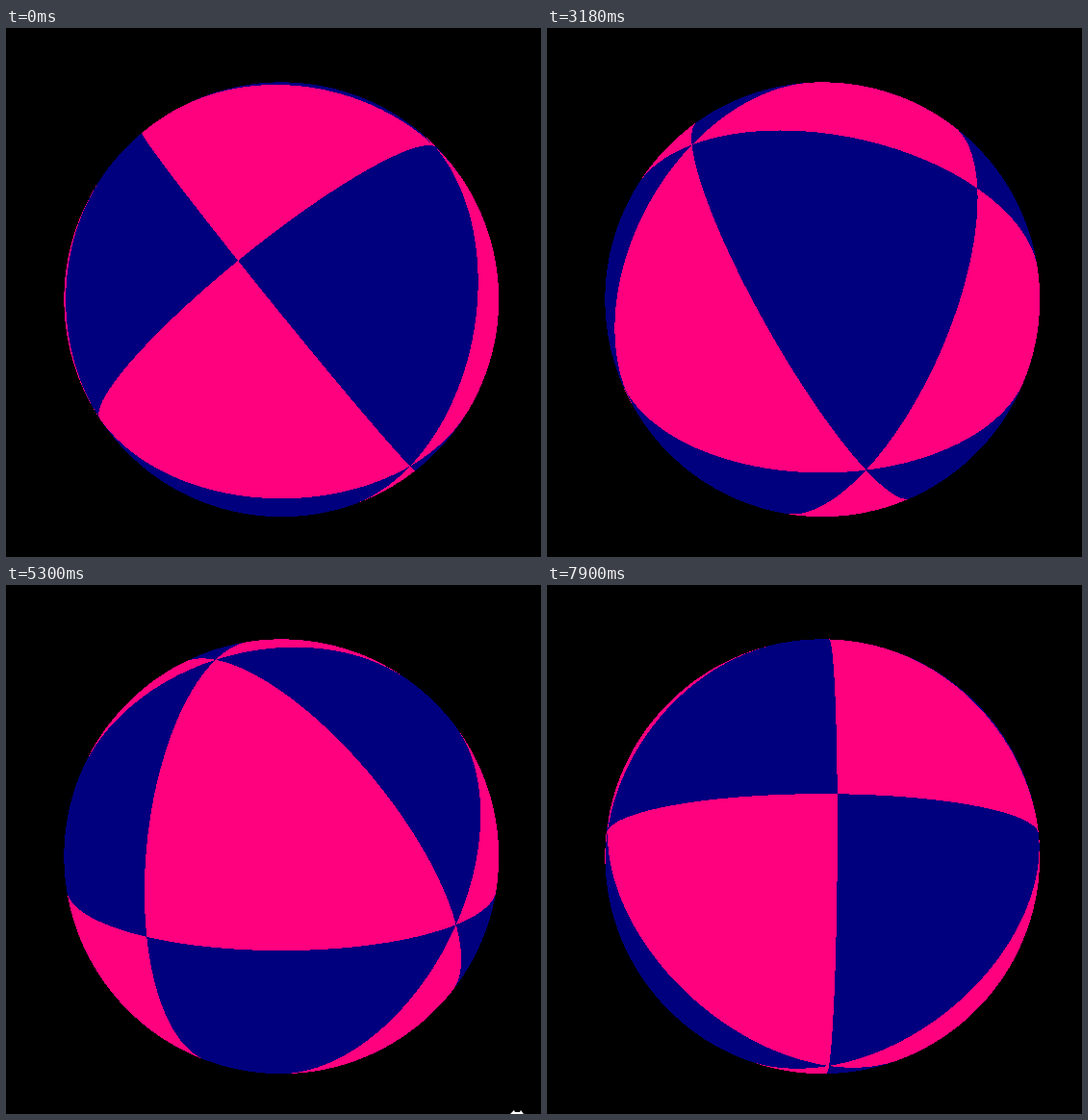
Write an HTML page with a canvas that moves like this. It is 556 px wide and 550 px high and loops after 8000 ms.

```html
<!DOCTYPE html>
<html lang="en">
<head>
<meta charset="utf-8">
<title>Turning ball</title>
<style>
  html, body { margin: 0; width: 100%; height: 100%; overflow: hidden; background: #000; }
  canvas { display: block; width: 556px; height: 550px; }
</style>
</head>
<body>
<canvas id="stage" width="556" height="550"></canvas>
<script>
const LOOP = 8000, STEP = 117.9;
const CX = 285.75, CY = 281.75, R = 225.9;
const DIST = 1.87;                       // camera distance in ball radii
const RAD = Math.PI / 180, TILT = 5 * RAD;
const PINK = 0xff7f00ff, NAVY = 0xff7f0000;   // ABGR

const ctx = document.getElementById('stage').getContext('2d');
const left = Math.floor(CX - R), upper = Math.floor(CY - R), size = 455;
const image = ctx.createImageData(size, size);
const pixels = new Uint32Array(image.data.buffer).fill(0xff000000);

// Point of the ball seen through each pixel, in camera space
const index = [], points = [];
for (let j = 0; j < size; j++) {
  for (let i = 0; i < size; i++) {
    const x = (left + i - CX) / R, y = (upper + j - CY) / R;
    const q = x * x + y * y;
    if (q > 1) continue;
    const k2 = 1 / (DIST * DIST - 1);
    const t = (DIST - Math.sqrt(1 - q)) / (1 + q * k2);
    const k = t * Math.sqrt(k2);
    index.push(j * size + i);
    points.push(k * x, k * y, DIST - t);
  }
}
const hits = new Float64Array(points);

const cross = (a, b) => [
  a[1] * b[2] - a[2] * b[1],
  a[2] * b[0] - a[0] * b[2],
  a[0] * b[1] - a[1] * b[0]
];
const unit = v => v.map(c => c / Math.hypot(...v));

// Camera follows a slightly oval orbit; its upright is a fixed diagonal
function camera(step) {
  const turn = (-6.9 + 1.569 * step) * RAD;
  const a = turn + 0.4 * RAD * Math.sin(2 * turn);
  const z = [Math.cos(TILT) * Math.cos(a), Math.cos(TILT) * Math.sin(a), Math.sin(TILT)];
  const x = unit(cross(z, [-1, 0, 1]));
  return [x, cross(x, z), z];
}

// Six mirror planes of a tetrahedron split the surface into two colours
function drawBall(step) {
  const [u, v, w] = camera(step);
  for (let n = 0, p = 0; n < index.length; n++, p += 3) {
    const x = hits[p], y = hits[p + 1], z = hits[p + 2];
    const a = (u[0] * x + v[0] * y + w[0] * z) ** 2;
    const b = (u[1] * x + v[1] * y + w[1] * z) ** 2;
    const c = (u[2] * x + v[2] * y + w[2] * z) ** 2;
    pixels[index[n]] = (a - b) * (b - c) * (c - a) < 0 ? NAVY : PINK;
  }
  ctx.putImageData(image, left, upper);
}

function drawPointer() {
  ctx.fillStyle = '#fff';
  ctx.beginPath();
  [[524, 550], [528, 546], [529, 548], [534, 548], [535, 546], [538, 550]]
    .forEach(p => ctx.lineTo(...p));
  ctx.fill();
}

const start = performance.now();
let shown = -1;
function tick() {
  const time = (performance.now() - start) % LOOP;
  const step = Math.floor((time + 8) / STEP);
  if (step !== shown) {
    shown = step;
    ctx.fillStyle = '#000';
    ctx.fillRect(0, 0, 556, 550);
    drawBall(step);
    if (step === 45) drawPointer();
  }
  requestAnimationFrame(tick);
}
tick();
</script>
</body>
</html>
```
